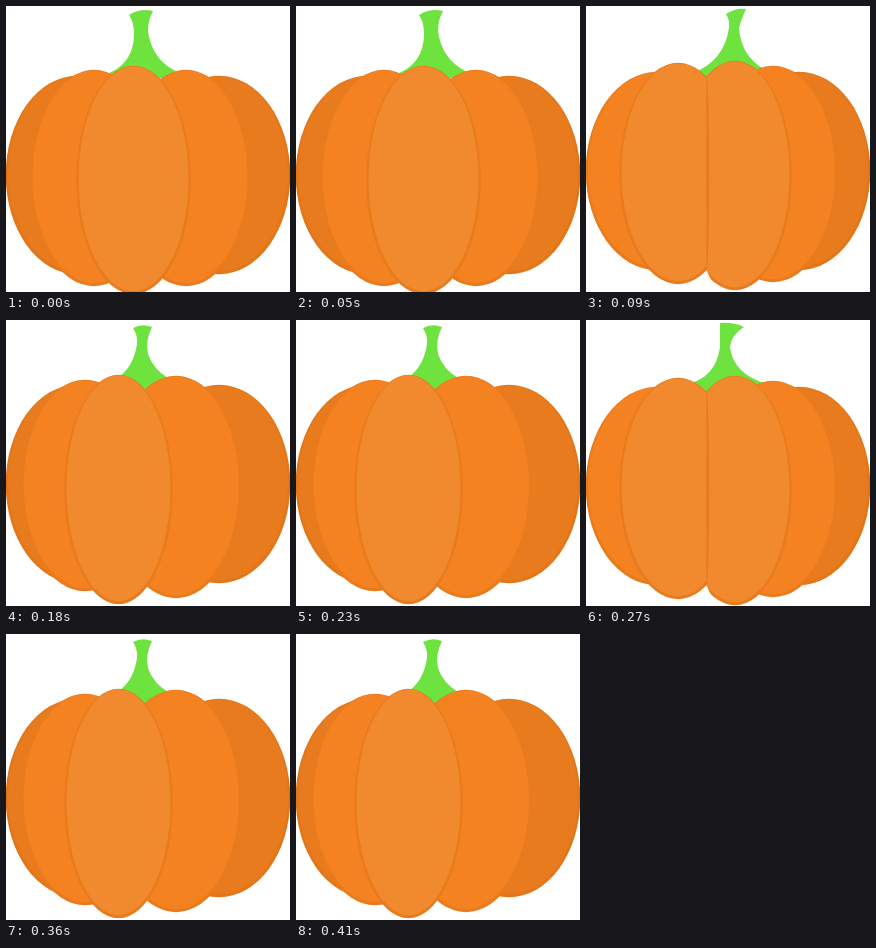
Recreate the animation shown at these times as an HTML page with a canvas. Size 284 by 286 pixels, loop 0.45 s.

```html
<!DOCTYPE html>
<html lang="en">
<head>
<meta charset="utf-8">
<title>Spinning pumpkin</title>
<style>
  html, body { margin: 0; width: 100%; height: 100%; overflow: hidden; background: #fff; }
  canvas { display: block; }
</style>
</head>
<body>
<canvas id="stage" width="284" height="286"></canvas>
<script>
const ctx = document.getElementById('stage').getContext('2d');
const STEP = 90;

// Each tone is [face, rim]
const BACK = ['#e87b1e', '#e27618'];
const MID = ['#f58220', '#e87b1e'];
const FRONT = ['#f18a2e', '#e87b1e'];

function oval(x, y, rx, ry, color) {
  ctx.fillStyle = color;
  ctx.beginPath();
  ctx.ellipse(x, y, rx, ry, 0, 0, Math.PI * 2);
  ctx.fill();
}

// The face sits high inside its rim, leaving a thicker edge below.
function rib([face, rim], x, y, rx, ry) {
  oval(x, y, rx, ry, rim);
  oval(x, y - 1.2, rx - 2.4, ry - 1.8, face);
}

function stem(path) {
  ctx.fillStyle = '#6ee23e';
  ctx.fill(new Path2D(path));
}

function sides(leftTone, y) {
  rib(leftTone, 71, y, 71.3, 99.2);
  rib(BACK, 213, y, 71.3, 99.2);
}

function wide() {
  stem('M123 9Q134 2 147 5Q140 18 143 31Q149 57 174 67L127 80L98 69Q128 59 128 28Q128 16 123 9Z');
  sides(BACK, 169);
  rib(MID, 88, 172, 63.8, 108.2);
  rib(MID, 180, 172, 63.8, 108.2);
  rib(FRONT, 127.5, 174, 57.3, 114.2);
}

function turned() {
  stem('M127 8Q136 3 146 7Q139 21 142 34Q147 49 162 58L138 72L112 58Q128 46 131 24Q132 16 127 8Z');
  sides(BACK, 164);
  rib(MID, 79, 165.5, 63.8, 105.7);
  rib(MID, 170, 167, 65.3, 111.2);
  rib(FRONT, 112.5, 169.5, 54.3, 114.7);
}

// Two front ribs meeting at a straight seam
function split(dy, stemPath) {
  stem(stemPath);
  ctx.save();
  ctx.translate(0, dy);
  sides(MID, 165);
  rib(MID, 187, 168, 64.3, 108.2);
  rib(FRONT, 92, 167.5, 58.8, 110.7);
  ctx.clip(new Path2D('M120.5 0H284V286H130L120.5 264Z'));
  rib(FRONT, 149, 169.5, 56.8, 114.7);
  oval(120.5, 168, 2.8, 97, FRONT[1]);
  ctx.restore();
}

const poses = [
  wide,
  () => split(0, 'M140 8Q149 2 160 3Q155 14 153 22Q155 50 178 63L121 76L107 67Q138 55 143 22Q144 14 140 8Z'),
  turned,
  () => split(1, 'M134 3Q147 2 158 7Q145 15 144 27Q147 54 181 64L121 77L102 64Q130 57 134 27Z'),
  turned
];

function draw() {
  ctx.fillStyle = '#fff';
  ctx.fillRect(0, 0, 284, 286);
  poses[Math.floor(performance.now() / STEP) % poses.length]();
  requestAnimationFrame(draw);
}
draw();
</script>
</body>
</html>
```
